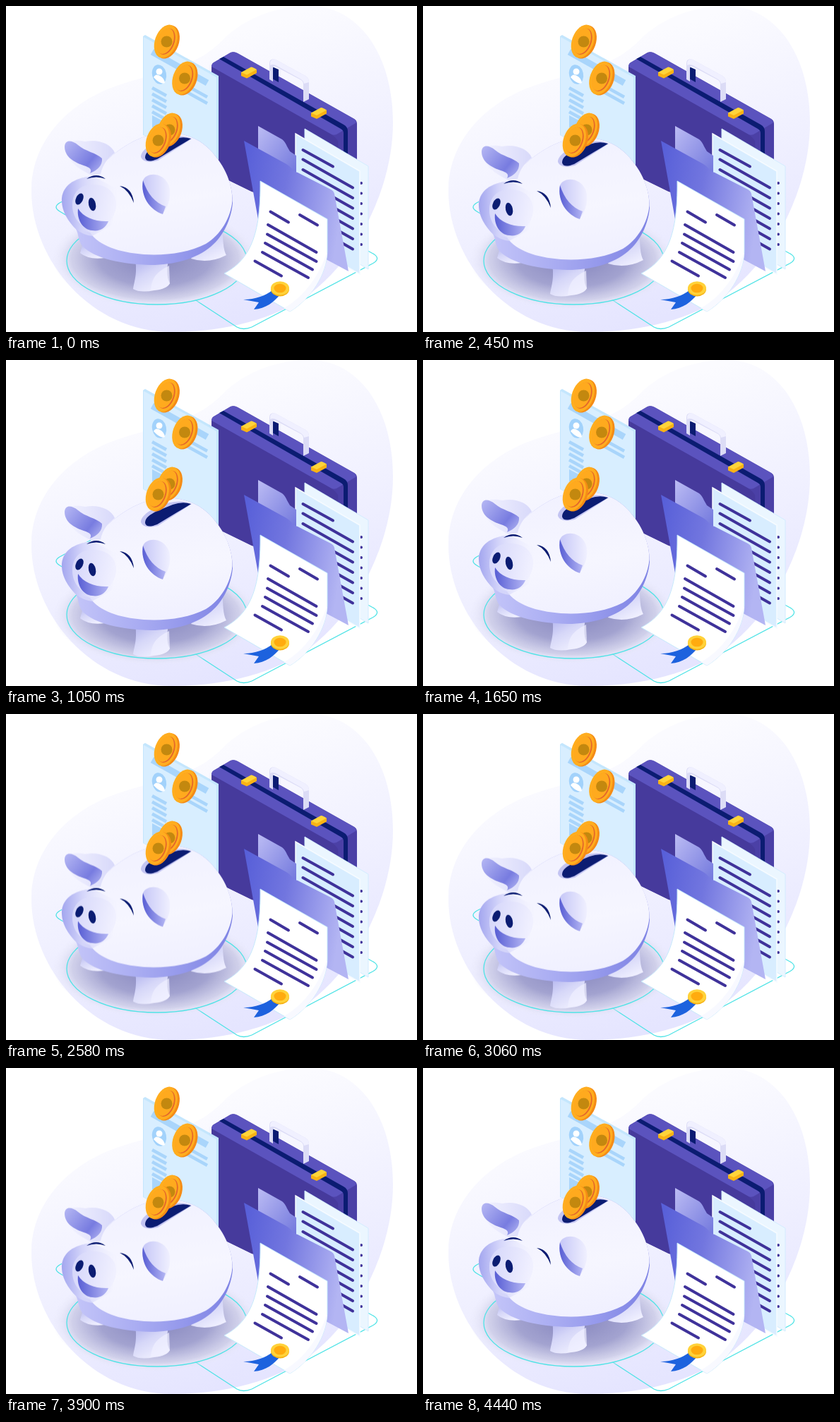
An HTML page without scripts that plays this animation: 582 by 462 pixels, repeating every 4500 ms.

```html
<!DOCTYPE html>
<html lang="en">
<head>
<meta charset="utf-8">
<title>Savings</title>
<style>
html, body { margin: 0; width: 100%; height: 100%; overflow: hidden; background: #fff; }
svg { display: block; width: 100%; height: 100%; }
.bob { --dx: 0px; --dy: 1px; animation: bob 4500ms linear infinite; }
.shade { --dx: .09px; --dy: .25px; }
@keyframes bob {
  0%, 98.67%, 100% { transform: translate(0, 0); }
  10%, 36.67% { transform: translate(calc(var(--dx) * 7), calc(var(--dy) * 7)); }
  23.33%, 24.6% { transform: translate(calc(var(--dx) * 16), calc(var(--dy) * 16)); }
  47% { transform: translate(0, 0); }
  51.33% { transform: translate(calc(var(--dx) * 3), calc(var(--dy) * 3)); }
  72.67% { transform: translate(calc(var(--dx) * 15.5), calc(var(--dy) * 15.5)); }
  84.67% { transform: translate(calc(var(--dx) * 8), calc(var(--dy) * 8)); }
}
.ink { stroke: #3f329a; stroke-width: 4; stroke-linecap: round; fill: none; }
.bar { stroke: #a9d5fb; stroke-width: 4.5; fill: none; }
.cyan { stroke: #4fe3e6; stroke-width: 1.3; fill: none; }
.navy { fill: #0b1c72; }
</style>
</head>
<body>
<svg viewBox="0 0 582 462" preserveAspectRatio="none">
<defs>
  <linearGradient id="blob" gradientUnits="userSpaceOnUse" x1="225" y1="70" x2="345" y2="440">
    <stop offset="0" stop-color="#fbfbff"/><stop offset="1" stop-color="#e5e5ff"/>
  </linearGradient>
  <radialGradient id="shadow">
    <stop offset="0" stop-color="#8585bd"/><stop offset=".55" stop-color="#a3a3d0"/>
    <stop offset=".82" stop-color="#cdcde8" stop-opacity=".9"/><stop offset="1" stop-color="#ececfa" stop-opacity=".1"/>
  </radialGradient>
  <linearGradient id="folder" x1="0" y1="0" x2="1" y2=".2">
    <stop offset="0" stop-color="#565ed8"/><stop offset=".45" stop-color="#7276df"/><stop offset="1" stop-color="#b3b5f3"/>
  </linearGradient>
  <linearGradient id="tab" x1="0" y1="0" x2="1" y2="1">
    <stop offset="0" stop-color="#bcbcf4"/><stop offset="1" stop-color="#7076dc"/>
  </linearGradient>
  <linearGradient id="belly">
    <stop offset="0" stop-color="#c9cafa"/><stop offset=".45" stop-color="#a9acf2"/><stop offset="1" stop-color="#7d82e4"/>
  </linearGradient>
  <linearGradient id="back" x1=".35" y1="0" x2=".6" y2="1">
    <stop offset="0" stop-color="#f1f1ff"/><stop offset=".6" stop-color="#f6f6ff"/><stop offset="1" stop-color="#f0f0ff"/>
  </linearGradient>
  <linearGradient id="head">
    <stop offset="0" stop-color="#a3a6ef"/><stop offset=".35" stop-color="#d3d4fa"/><stop offset="1" stop-color="#f1f1ff" stop-opacity="0"/>
  </linearGradient>
  <linearGradient id="snout" x1="0" y1="0" x2="1" y2=".2">
    <stop offset="0" stop-color="#d4d5fa"/><stop offset="1" stop-color="#f0f0ff"/>
  </linearGradient>
  <linearGradient id="deep">
    <stop offset="0" stop-color="#585ed4"/><stop offset="1" stop-color="#b4b6f4"/>
  </linearGradient>
  <linearGradient id="fold" x1="0" y1="0" x2="1" y2=".7">
    <stop offset="0" stop-color="#b6b8f4"/><stop offset=".75" stop-color="#787ce0"/><stop offset="1" stop-color="#9fa2ec"/>
  </linearGradient>
  <linearGradient id="pale">
    <stop offset="0" stop-color="#f3f3ff"/><stop offset="1" stop-color="#d8d9fa"/>
  </linearGradient>
  <linearGradient id="lobe">
    <stop offset="0" stop-color="#c6c7f7"/><stop offset="1" stop-color="#f0f0ff"/>
  </linearGradient>
  <linearGradient id="leg" x1="0" y1="0" x2=".6" y2="1">
    <stop offset="0" stop-color="#aeb0ed"/><stop offset=".5" stop-color="#d6d7f8"/><stop offset="1" stop-color="#efefff"/>
  </linearGradient>
  <g id="coin">
    <g transform="rotate(20)">
      <ellipse cx="1.3" rx="16" ry="24.5" fill="#f58c16"/>
      <ellipse cx="-1.3" rx="15.3" ry="24.3" fill="#ffad1f"/>
      <ellipse cx="-.6" rx="11.6" ry="19.3" fill="#e4682b"/>
      <ellipse cx="-1.9" rx="11" ry="18.9" fill="#ffaa1e"/>
    </g>
    <circle r="8" fill="#c3880f"/>
  </g>
  <g id="clasp">
    <path d="M333 94V99L341 102.500 355 95V90Z" fill="#f9b315"/>
    <path d="M333 94 347 86.500Q349 86 355 90L341 97.500Z" fill="#ffd43a"/>
  </g>
</defs>

<path d="M430 0C500 0 548 70 548 165C548 250 505 345 440 400C390 443 310 462 235 462C120 462 36 360 36 262C36 190 90 135 160 112C230 90 270 85 305 50C338 16 385 0 430 0Z" fill="url(#blob)"/>
<path class="cyan" d="M130 250 76 279Q66 285 76 291L96 303M268 416.500 327 455Q336 460 348 455L520 364.500Q532 357 518 350L505 343"/>

<!-- briefcase -->
<path d="M291 86Q291 81 296 79L318 66Q323 64 328 67L493 160Q497 162 497 167V300L348 263 303 241Z" fill="#4b40a6"/>
<path d="M291 86Q291 81 296 79L318 66Q323 64 328 67L493 160Q497 163 495 166L468 182Q463 184 459 181Z" fill="#5b53be"/>
<path d="M291 86 459 181Q466 185 470 191L476 300 348 263 303 241 291 200Z" fill="#463a9c"/>
<path d="M302 75 308 72 478 168Q484 171 484 178V215H478V180Q478 176 474 174Z" class="navy"/>
<path d="M377 86 386 90V108L377 103Z" class="navy"/>
<path d="M373 104V82Q373 73 382 76L424 99Q429 102 429 108V132L421 136V110Q421 107 418 105L382 86Q378 84 378 89V107Z" fill="#dcdcf6"/>
<path d="M374 80Q376 73 383 76.500L424 99Q429 102 429 108L422 110Q421 106 418 104L382 84Q377 82 374 84Z" fill="#f0f0ff"/>
<use href="#clasp"/><use href="#clasp" x="99" y="57.500"/>

<!-- profile sheet -->
<path d="M194 43 197 41 301 99V241L194 183Z" fill="#c4e6fd"/>
<path d="M195 44 298 101V241L195 183Z" fill="#d8eeff"/>
<g class="bar">
  <path d="M207 65 285 109" style="stroke-width:9"/>
  <path d="M247 108 285 129M247 117 285 138"/>
  <path id="row" d="M207 116 227 127"/>
  <use href="#row" y="8.500"/><use href="#row" y="17"/><use href="#row" y="25.500"/><use href="#row" y="34"/>
</g>
<path d="M207 155 228 166V184L207 172Z" fill="#a9d5fb"/>
<ellipse cx="217" cy="97" rx="10" ry="14" transform="rotate(-12 217 97)" fill="#a2d2fb"/>
<circle cx="217" cy="93" r="4.500" fill="#fff"/>
<path d="M209 101Q212 95 218 99Q224 102 225 109Q219 112 209 101Z" fill="#fff"/>

<!-- papers -->
<path d="M423 174 513 227V373L423 320Z" fill="#ebf6ff" stroke="#d3ecff"/>
<path class="ink" style="stroke-dasharray:.1 14.400" d="M503 251V341"/>
<path d="M410 181 501 234V380L410 328Z" fill="#d8edff" stroke="#f6fbff" stroke-width="1.500"/>
<g class="ink">
  <path d="M420.500 204 463 227.500"/>
  <path id="line" d="M420.500 217.500 491 257.500"/>
  <use href="#line" y="14.500"/><use href="#line" y="29"/><use href="#line" y="43.500"/>
  <use href="#line" y="58"/><use href="#line" y="72.500"/><use href="#line" y="87"/>
</g>

<!-- folder -->
<path d="M357 170 391 189Q395 192 398 199L402 206 411 212V240L357 205Z" fill="url(#tab)"/>
<path d="M337 191 397 224Q402 227 405 231T413 236L460 260Q464 262 465 266L485 376 455 360 357 302Z" fill="url(#folder)"/>

<!-- floor ring and shadow -->
<ellipse cx="213" cy="361" rx="127" ry="62" fill="#ececff"/>
<ellipse class="bob shade" cx="211" cy="358" rx="144" ry="70" fill="url(#shadow)"/>
<ellipse class="cyan" cx="213.500" cy="361" rx="127.500" ry="62"/>

<!-- pig -->
<g class="bob">
  <path d="M110 332 105 350Q117 360 140 357L136 335Z" fill="url(#leg)"/>
  <path d="M268 345 262 358Q287 366 312 353Q307 345 307 320Z" fill="url(#leg)"/>
  <path d="M183 358C186 380 182 388 180 401Q190 407 210 403Q228 401 232 393Q226 384 230 358Z" fill="url(#leg)"/>
  <path d="M205 403C206 385 213 377 231 368L232 393Q226 401 205 403Z" fill="#f0f0ff" opacity=".7"/>
  <path d="M79 272C81 255 95 244 122 241C134 225 165 194 200 184C230 174 265 181 285 200C308 222 321 250 321 279C319 302 308 326 290 341C270 358 238 367 205 367C165 366 125 358 108 340C102 332 103 323 99 316C88 305 78 290 79 272Z" fill="url(#belly)"/>
  <path d="M79 272C81 255 95 244 122 241C134 225 165 194 200 184C230 174 265 181 285 200C308 222 321 250 320.500 276C318 301 304 324 283 337C258 350 225 354 195 352C160 349 132 340 119 321C112 318 104 318 99 312C88 303 78 290 79 272Z" fill="url(#back)"/>
  <path d="M79 272C81 255 95 244 122 241L160 260 150 310 122 326Q108 324 99 316C88 305 78 290 79 272Z" fill="url(#head)"/>

  <path d="M84 195C90 190 103 190 112 192C130 188 149 195 154 208C144 216 137 224 134 238L121 240C105 231 84 222 84 195Z" fill="url(#pale)"/>
  <path d="M83 199C84 189 93 190 102 197C112 206 128 208 136 216C137 226 129 233 119 237C122 231 119 229 110 226C93 220 83 212 83 199Z" fill="url(#fold)"/>

  <path d="M194 247C199 235 222 235 230 253C236 268 229 285 222 294C204 289 190 270 194 247Z" fill="url(#lobe)"/>
  <path d="M194 247C190 270 204 289 222 295L226 284C211 279 200 266 194 247Z" fill="url(#deep)"/>

  <path d="M94 280C95 262 108 252 122 253C143 252 157 265 156 282C155 300 140 318 122 318C106 314 93 300 94 280Z" fill="url(#snout)"/>
  <path d="M102 287C110 300 127 306 145 305C141 315 132 320 122 318C109 317 100 303 102 287Z" fill="url(#deep)"/>
  <ellipse class="navy" cx="104" cy="273.500" rx="5" ry="8.500" transform="rotate(25 104 273.500)"/>
  <ellipse class="navy" cx="122" cy="281" rx="5" ry="9.500" transform="rotate(-12 122 281)"/>
  <path class="navy" d="M114 245Q128 235 141 245Q128 240 114 245Z"/>
  <path class="navy" d="M161 255Q179 257 181 279Q174 261 161 255Z"/>

  <path d="M191 214C190 203 214 190 232 186Q250 182 263 188L215 219Q195 224 191 214Z" fill="#c3c4f2"/>
  <path class="navy" d="M197 215C197 207 204 203 214 198L236 189Q250 184 262 188Q254 193 242 200L214 217Q199 223 197 215Z"/>
</g>

<!-- coins -->
<use href="#coin" x="227.500" y="50.500"/>
<use href="#coin" x="253" y="102.500"/>
<use href="#coin" x="231.500" y="175.500"/>
<use href="#coin" x="215.500" y="190.500"/>

<!-- certificate -->
<path d="M360 248 455 302V348C454 380 432 415 402 433L309 379C345 360 361 325 360 248Z" fill="#fff" stroke="#c5e8fb" stroke-width="1"/>
<path d="M455 348C454 380 432 415 402 433L394 428C425 410 444 380 455 348Z" fill="#f8f9ff"/>
<path class="ink" d="M374.500 291.500 400 306.500M416 296 441 310.500M371 310 439.500 349M370 323.500 439.500 362M367 336 434 373.500M363 349 428 385M352.500 361.500 390 382.500"/>
<path d="M378 402.500C366 411 354 415.500 336 416L358 420 351 430C368 429 380 419 388 409Z" fill="#1d62de"/>
<ellipse cx="388" cy="401.500" rx="13" ry="10" fill="#f5b013"/>
<ellipse cx="388" cy="400" rx="13" ry="9.800" fill="#ffd23a"/>
<ellipse cx="388" cy="400" rx="8.500" ry="6.300" fill="#ffab0f"/>
</svg>
</body>
</html>
```
